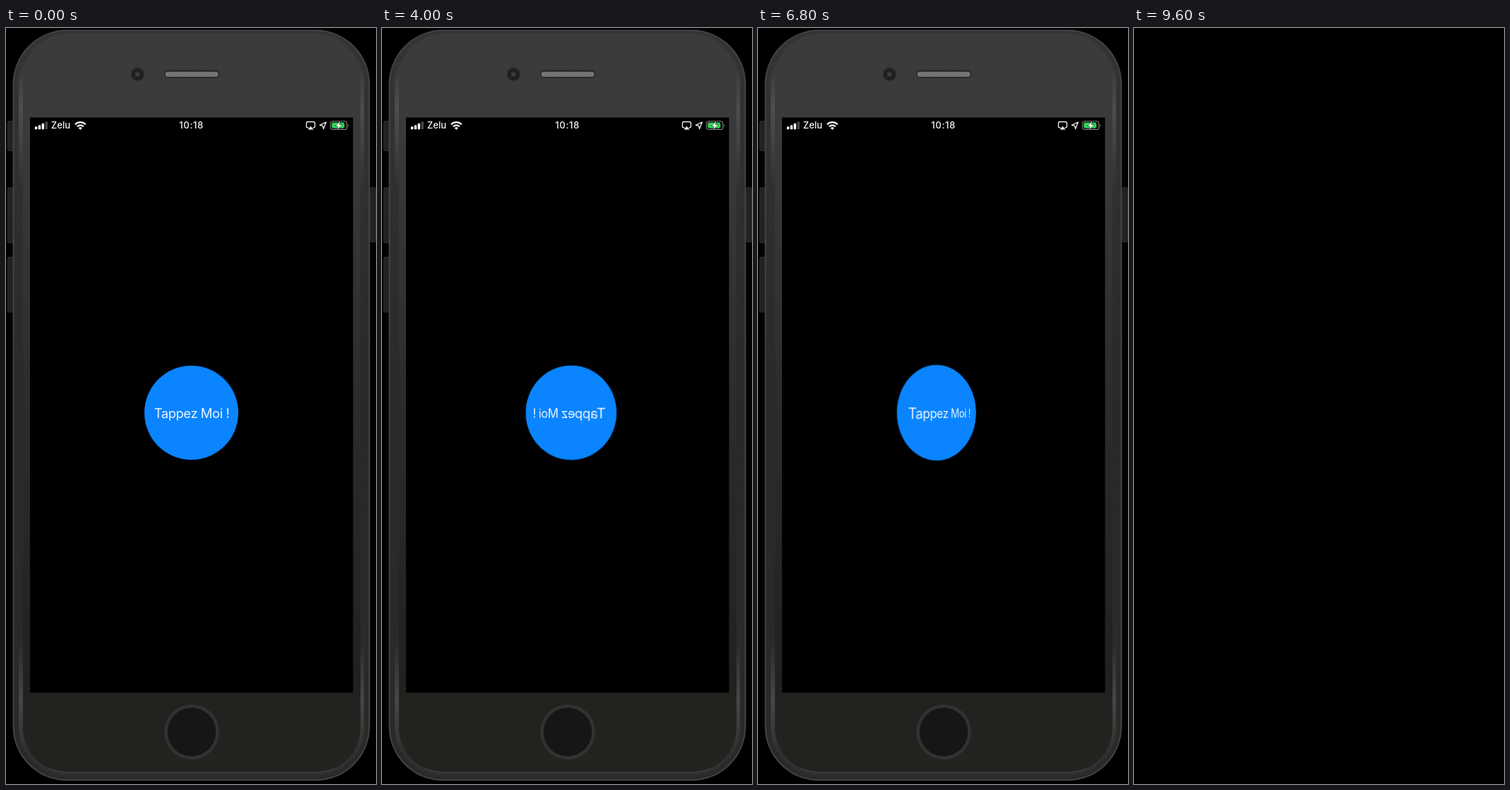
Write an HTML page that moves like this. It is 524x1068 px and loops after 9.8 s.

```html
<!DOCTYPE html>
<html lang="fr">
<head>
<meta charset="utf-8">
<title>Tappez Moi</title>
<style>
  html, body { margin: 0; width: 100%; height: 100%; overflow: hidden; background: #000; }
  #stage { position: absolute; left: 0; top: 0; width: 524px; height: 1068px; overflow: hidden; }
  svg { position: absolute; left: 0; top: 0; }
  text { font: 500 13.2px Inter, Roboto, sans-serif; fill: #f4f4f4; }
  #button {
    position: absolute; left: 196.2px; top: 477.2px; width: 133px; height: 133px;
    border-radius: 50%; background: #0a84ff; color: #e9f4ff;
    font: 400 18.4px/134px Inter, Roboto, sans-serif; letter-spacing: -.42px;
    text-align: center; text-indent: 1px; white-space: nowrap;
  }
</style>
</head>
<body>
<div id="stage">
  <svg width="524" height="1068" viewBox="0 0 524 1068">
    <defs>
      <linearGradient id="face" x1="0" y1="0" x2="0" y2="1">
        <stop offset="0" stop-color="#3b3b3d"/>
        <stop offset=".13" stop-color="#3a3a3c"/>
        <stop offset=".5" stop-color="#2c2c2c"/>
        <stop offset=".87" stop-color="#21221e"/>
        <stop offset="1" stop-color="#23241f"/>
      </linearGradient>
      <linearGradient id="rim" x1="0" y1="0" x2="0" y2="1">
        <stop offset="0" stop-color="#343436"/>
        <stop offset=".5" stop-color="#29292a"/>
        <stop offset="1" stop-color="#2a2a2a"/>
      </linearGradient>
      <linearGradient id="shine" x1="0" y1="0" x2="0" y2="1">
        <stop offset=".03" stop-color="#4e4e50" stop-opacity="0"/>
        <stop offset=".1" stop-color="#4e4e50"/>
        <stop offset=".21" stop-color="#4e4e50" stop-opacity="0"/>
        <stop offset=".82" stop-color="#4e4e50" stop-opacity="0"/>
        <stop offset=".9" stop-color="#4e4e50" stop-opacity=".8"/>
        <stop offset=".97" stop-color="#4e4e50" stop-opacity=".15"/>
      </linearGradient>
      <pattern id="mesh" width="3" height="3" patternUnits="userSpaceOnUse">
        <rect width="3" height="3" fill="#8a8a87"/>
        <path d="M0 0h1.5v1.5H0zM1.5 1.5H3V3H1.5z" fill="#5c5c5a"/>
      </pattern>
    </defs>

    <!-- side keys -->
    <g fill="#222223" stroke="#2c2c2d">
      <rect x="2.5" y="131.5" width="8" height="42" rx="2"/>
      <rect x="2.5" y="225.5" width="8" height="78" rx="2"/>
      <rect x="2.5" y="323.5" width="8" height="78" rx="2"/>
      <rect x="515.5" y="225.5" width="8" height="77" rx="2"/>
    </g>

    <!-- body -->
    <rect x="10.5" y="3.5" width="504" height="1059" rx="76" fill="url(#rim)" stroke="#434345" stroke-width="2"/>
    <rect x="21" y="10" width="483" height="1043" rx="65" fill="none" stroke="url(#shine)" stroke-width="6"/>
    <rect x="24" y="8" width="478" height="1043" rx="62" fill="url(#face)"/>
    <path d="M60 1046q14 5.500 26 5.500H440q12 0 26-5.500" fill="none" stroke="#444446" stroke-width="1.200"/>

    <!-- camera and speaker -->
    <circle cx="186.300" cy="65.300" r="9.300" fill="#222224"/>
    <circle cx="186.300" cy="65.300" r="5.200" fill="#2b2b2d" stroke="#171718"/>
    <circle cx="186.300" cy="65.300" r="2" fill="#48484b"/>
    <rect x="224" y="59.500" width="78" height="11" rx="5.500" fill="#262627"/>
    <rect x="225.500" y="61.700" width="75" height="7.200" rx="3.600" fill="url(#mesh)"/>

    <!-- home key -->
    <circle cx="263" cy="994.500" r="36.500" fill="#161616" stroke="#323234" stroke-width="4.500"/>

    <rect x="34" y="126.500" width="457.500" height="812.500" fill="#000"/>

    <!-- status bar -->
    <g id="bars" fill="#f4f4f4"></g>
    <text x="63.800" y="142.200">Zelu</text>
    <g fill="none" stroke="#f4f4f4" stroke-width="2.300">
      <path d="M97.800 136.200a10.600 10.600 0 0 1 15 0"/>
      <path d="M100.700 139.300a6.500 6.500 0 0 1 9.200 0"/>
    </g>
    <path d="M105.300 144l-2.600-2.700a3.700 3.700 0 0 1 5.200 0z" fill="#f4f4f4"/>
    <text x="262.600" y="142.200" text-anchor="middle" letter-spacing=".6">10:18</text>
    <path d="M428.500 140.800h-1a2 2 0 0 1-2-2v-4.300a2 2 0 0 1 2-2h8a2 2 0 0 1 2 2v4.300a2 2 0 0 1-2 2h-1" fill="none" stroke="#f4f4f4" stroke-width="1.300"/>
    <path d="M431.500 138.800l4 4.800h-8z" fill="#f4f4f4"/>
    <path d="M453.400 133l-3.800 9.600-1-4.200-4.100-1.100z" fill="none" stroke="#f4f4f4" stroke-width="1.300" stroke-linejoin="round"/>
    <rect x="459.500" y="131.800" width="23.300" height="11.600" rx="3.400" fill="none" stroke="#858587" stroke-width="1.100"/>
    <path d="M484.200 135.700q2.200 1.900 0 3.900z" fill="#858587"/>
    <rect x="461.300" y="133.600" width="18" height="8" rx="2" fill="#30d158"/>
    <path d="M473.400 131.800l-6.700 6.600h4l-2.200 5 7.200-6.700h-4.100z" fill="#fff" stroke="#000" stroke-width=".8" paint-order="stroke"/>
  </svg>
  <div id="button">Tappez Moi !</div>
</div>
<script>
  const LOOP = 9800, STEP = 200;
  const TAP = 2715, FADE = 8600, FADE_TIME = 1000;
  const STIFFNESS = 5, DAMPING = 1;
  const stage = document.getElementById('stage');
  const button = document.getElementById('button');

  document.getElementById('bars').innerHTML = [4, 6, 8.5, 11].map((h, i) =>
    `<rect x="${40.8 + i * 4.9}" y="${143.2 - h}" width="3.5" height="${h}" rx=".9" opacity="${i < 3 ? 1 : 0.28}"/>`
  ).join('');

  // Underdamped spring from 0 to 1, unit mass.
  function spring(s) {
    if (s <= 0) return 0;
    const decay = DAMPING / 2;
    const freq = Math.sqrt(STIFFNESS - decay * decay);
    return 1 - Math.exp(-decay * s) * (Math.cos(freq * s) + decay / freq * Math.sin(freq * s));
  }

  function draw(ms) {
    const t = Math.floor(ms % LOOP / STEP) * STEP;
    const angle = 360 * spring((t - TAP) / 1000);
    button.style.transform = `perspective(220px) rotateY(${angle}deg)`;
    stage.style.opacity = 1 - Math.min(1, Math.max(0, (t - FADE) / FADE_TIME));
  }

  const start = performance.now();
  function tick() {
    draw(performance.now() - start);
    requestAnimationFrame(tick);
  }
  tick();
</script>
</body>
</html>
```
